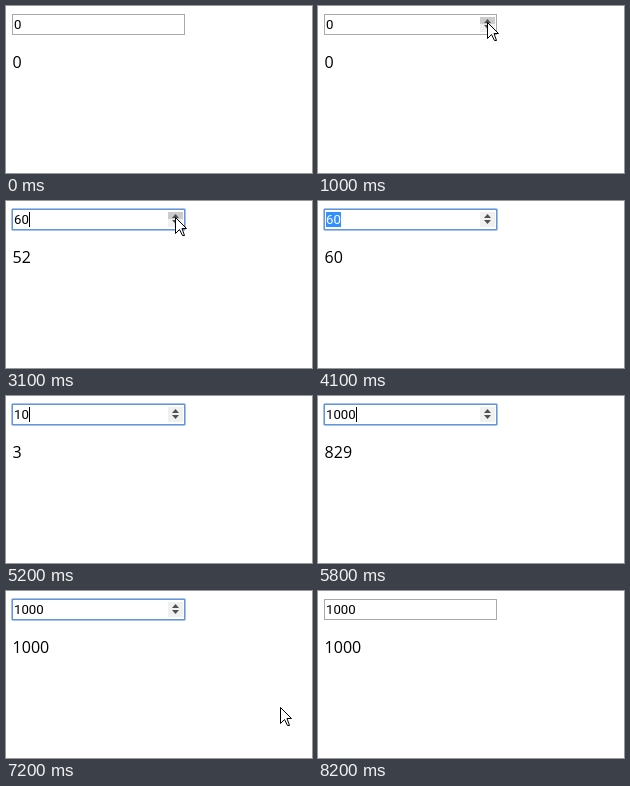
Recreate the animation shown at these times as an HTML page. Size 306 px wide and 167 px high, loop 8400 ms.

```html
<!DOCTYPE html>
<html lang="en">
<head>
<meta charset="utf-8">
<title>Animated number</title>
<style>
  html, body { margin: 0; width: 100%; height: 100%; overflow: hidden; background: #fff; }
  svg { display: block; }
  #value { font: 13.2px Roboto, Arial, sans-serif; }
  #total { font: 16px "Open Sans", "Noto Sans", sans-serif; }
</style>
</head>
<body>
<svg width="306" height="167" viewBox="0 0 306 167">
  <rect x="6.5" y="8.5" width="172" height="20" fill="#fff" stroke="#a9a9a9"/>
  <g id="ring" fill="none">
    <rect x="5.5" y="7.5" width="174" height="22" rx="1.5" stroke="#a6c3ee"/>
    <rect x="6.5" y="8.5" width="172" height="20" stroke="#6394dc"/>
  </g>
  <g id="spinner">
    <rect x="162" y="11" width="15" height="15" fill="#f0f0f0"/>
    <rect id="upButton" x="162" y="11" width="15" height="7"/>
    <path id="upArrow" d="M166 17h7l-3.5-4z"/>
    <path d="M166 19h7l-3.5 4z" fill="#505050"/>
  </g>
  <rect id="selection" x="8" y="11" width="15" height="15" fill="#3390ff"/>
  <text id="value" x="8" y="23"></text>
  <rect id="caret" y="11" width="1" height="15"/>
  <text id="total" x="6.6" y="62"></text>
  <path id="arrow" d="M.5 .5V16.5L4.5 12.5L7.5 18.5H9.5L7 11.5H11.5Z" fill="#fff" stroke="#000"/>
  <path id="beam" d="M-2.5 -8.5H3.5M.5 -8.5V8.5M-2.5 8.5H3.5" fill="none" stroke="#000"/>
</svg>
<script>
const LOOP = 8400, TICK = 100, TWEEN = 500, BLINK = 500;
const FOCUS = 1200, DRAG = 3801, SELECT = 4100, BLUR = 8200;
const $ = id => document.getElementById(id);
const show = (id, on) => $(id).style.display = on ? '' : 'none';

// Three clicks add 20 each, then 1000 is typed digit by digit
const edits = [{ time: 0, value: 0 }];
[1101, 2101, 2801].forEach((time, i) => edits.push({ time, value: 20 * (i + 1) }));
for (let i = 0; i < 4; i++) edits.push({ time: 5395 - 164 * (3 - i), value: 10 ** i });

// Pointer strokes as [time, x, y]; the pointer is hidden between them
const strokes = [
  [[200, 240, 2], [700, 164, 19], [1000, 169, 16], [3400, 169, 16], [3600, 124, 20], [3800, 124, 20], [4000, 62, 20]],
  [[6300, 86, 104], [6400, 159, 109], [6500, 159, 109], [6600, 193, 107], [6900, 235, 95], [7300, 287, 123]]
];

function pointerAt(t) {
  for (const stroke of strokes) {
    const i = stroke.findIndex(p => p[0] >= t);
    if (i < 0 || t < stroke[0][0]) continue;
    const [t1, x1, y1] = stroke[i], [t0, x0, y0] = stroke[i - 1] || [t - 1, x1, y1];
    const k = (t - t0) / (t1 - t0);
    return { x: Math.round(x0 + (x1 - x0) * k), y: Math.round(y0 + (y1 - y0) * k) };
  }
}

function draw(t) {
  const n = edits.filter(e => e.time <= t).length - 1;
  const { time, value } = edits[n];
  const from = n ? edits[n - 1].value : 0;
  const k = Math.min(1, (t - time) / TWEEN);
  $('total').textContent = Math.round(from + (value - from) * k);
  $('value').textContent = value;

  const focused = t >= FOCUS && t < BLUR;
  const selected = t >= SELECT && time < SELECT;
  const touched = t > DRAG ? Math.max(time, DRAG) : time;
  show('ring', focused);
  show('selection', selected);
  $('value').setAttribute('fill', selected ? '#fff' : '#000');
  show('caret', focused && !selected && Math.floor((t - touched) / BLINK) % 2 === 0);
  $('caret').setAttribute('x', Math.round(8 + String(value).length * 7.41));

  const pointer = pointerAt(t);
  const inside = pointer && pointer.x < 179 && pointer.y > 8 && pointer.y < 29;
  const hover = inside && pointer.x >= 162;
  const pressed = hover && n > 0 && t - time < 150;
  show('spinner', focused || inside);
  $('upButton').setAttribute('fill', pressed ? '#787878' : hover ? '#cbcbcb' : '#f0f0f0');
  $('upArrow').setAttribute('fill', pressed ? '#fff' : '#505050');

  show('arrow', pointer && !(inside && !hover));
  show('beam', inside && !hover);
  if (pointer) {
    for (const id of ['arrow', 'beam']) $(id).setAttribute('transform', `translate(${pointer.x} ${pointer.y})`);
  }
}

const origin = performance.now();
function frame() {
  const t = (performance.now() - origin) % LOOP;
  draw(Math.floor(t / TICK) * TICK);
  requestAnimationFrame(frame);
}
frame();
</script>
</body>
</html>
```
